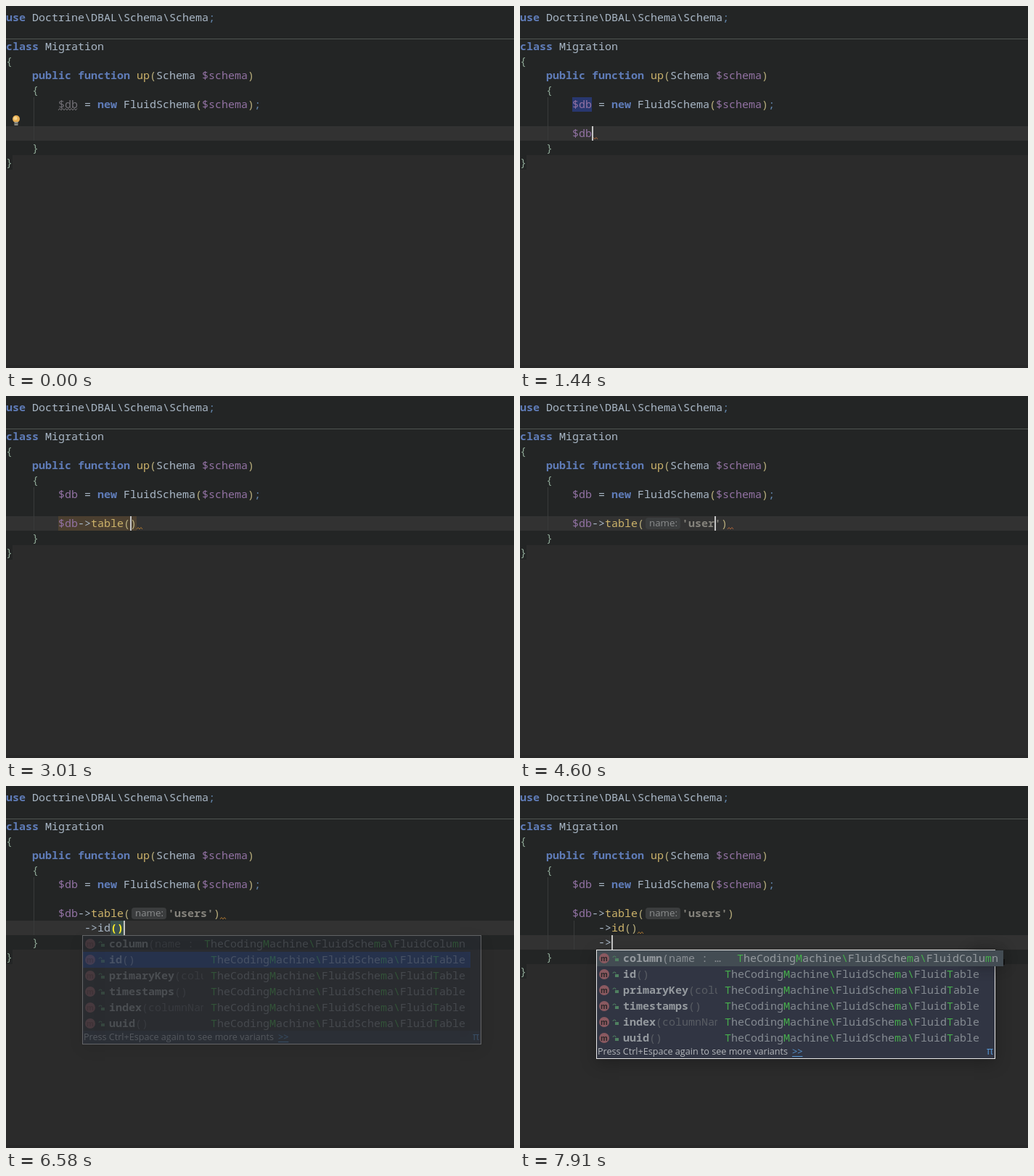
These frames come from a looping animation (700x500 px, 8000 ms). An HTML page with a canvas:

```html
<!DOCTYPE html>
<html lang="en">
<head>
<meta charset="utf-8">
<title>Fluid schema migration</title>
<style>
html, body { margin: 0; width: 100%; height: 100%; overflow: hidden; background: #2b2b2b; }
canvas { display: block; }
</style>
</head>
<body>
<canvas id="stage" width="700" height="500"></canvas>
<script>
const ctx = document.getElementById('stage').getContext('2d');
const LOOP = 8000, CH = 9, LINE = 20, HINT = 52;
const MONO = '15px "Noto Sans Mono", "DejaVu Sans Mono", monospace';
const SANS = '"Open Sans", "Noto Sans", sans-serif';

const C = {
  bg: '#2b2b2b', code: '#232525', row: '#323232', text: '#a9b7c6', keyword: '#5f7cb8',
  variable: '#9272a3', func: '#cdb36a', string: '#85837c', paren: '#b9ae7c', brace: '#8ca594',
  semi: '#6286ad', unused: '#727076', guide: '#393b3b', warn: '#a87430',
  matchBg: '#3b514d', match: '#ffef28', popup: '#313543', green: '#46ad4c'
};

const NS = 'TheCodingMachine\\FluidSchema\\';
const TABLE = NS + 'FluidTable', SCHEMA = 'Doctrine\\DBAL\\Schema\\Schema';
const LISTS = {
  vars: {
    rows: [
      ['schema', SCHEMA], ['this', NS + 'Migration'], ['db', NS + 'FluidSchema'],
      ['_COOKIE', 'array'], ['_ENV', 'array'], ['_FILES', 'array']
    ],
    height: 139, hint: 'global'
  },
  db: {
    rows: [
      ['junctionTable(table1, table2)', NS + 'FluidSchema'],
      ['table(name : string)', TABLE], ['getDbalSchema()', SCHEMA]
    ],
    height: 84, hint: 'more'
  },
  table: {
    rows: [
      ['column(name : string)', NS + 'FluidColumn'], ['id()', TABLE],
      ['primaryKey(columnNames)', TABLE], ['timestamps()', TABLE],
      ['index(columnNames)', TABLE], ['uuid()', TABLE]
    ],
    height: 150, hint: 'more'
  }
};

// Each event changes part of the editor state.
const start = {
  lines: ['', '', ''], row: 0, caret: -1, unused: true, bulb: true, write: false, warn: null,
  glow: 0, hint: false, match: null, plainId: false, inner: false,
  list: null, x: 0, y: 0, alpha: 1, lock: false, sel: 0, wide: false, glare: 0, active: false
};
const events = [
  [170, { caret: 72 }],
  [740, { l0: '$', caret: 81, bulb: false }],
  [830, { list: 'vars', x: 60, y: 186, alpha: .35 }],
  [870, { alpha: .7 }],
  [920, { alpha: 1 }],
  [1050, { l0: '$d', caret: 90 }],
  [1090, { l0: '$db', caret: 99, alpha: .35 }],
  [1130, { list: null }],
  [1440, { unused: false, write: true, warn: [99, 0] }],
  [1590, { l0: '$db-', caret: 108, warn: [108, 0] }],
  [1640, { l0: '$db->', caret: 117, warn: [117, 0] }],
  [1790, { list: 'db', x: 96, y: 186, alpha: .4 }],
  [1830, { alpha: 1 }],
  [1880, { lock: true }],
  [1920, { wide: true, glare: 1 }],
  [2340, { caret: -1 }],
  [2430, { sel: 1, wide: false, glare: 0, active: true }],
  [2470, { wide: true }],
  [2700, { l0: '$db->table()', caret: 171, warn: null, alpha: .3, wide: false }],
  [2740, { list: null }],
  [3010, { write: false, glow: 108, warn: [180, 0] }],
  [3540, { l0: "$db->table('')", caret: 180, glow: 126 }],
  [3670, { warn: [198, 0] }],
  [3980, { glow: 0 }],
  [4020, { hint: true, caret: 232, warn: [250, 0] }],
  [4280, { l0: "$db->table('u')", caret: 241, warn: [259, 0] }],
  [4350, { l0: "$db->table('us')", caret: 250, warn: [268, 0] }],
  [4430, { l0: "$db->table('use')", caret: 259, warn: [277, 0] }],
  [4600, { l0: "$db->table('user')", caret: 268, warn: [286, 0] }],
  [4690, { l0: "$db->table('users')", caret: 277, warn: [295, 0] }],
  [4960, { match: [162, 286, 0], caret: 295 }],
  [5240, { row: 1, caret: 108 }],
  [5280, { match: null }],
  [5600, { l1: '-', caret: 117 }],
  [5690, { l1: '->', caret: 126 }],
  [5780, { list: 'table', x: 105, y: 206, alpha: 1, lock: false, sel: 0, wide: false, active: false }],
  [5820, { lock: true }],
  [5870, { wide: true, glare: 1 }],
  [6060, { glare: .5 }],
  [6110, { glare: 0 }],
  [6280, { wide: false }],
  [6330, { sel: 1, active: true }],
  [6580, { l1: '->id()', caret: 162, plainId: true, match: [144, 153, 1], alpha: .3 }],
  [6620, { list: null }],
  [6840, { plainId: false, warn: [162, 1] }],
  [7010, { row: 2, caret: 108, match: null, inner: true }],
  [7610, { l2: '-', caret: 117 }],
  [7690, { l2: '->', caret: 126 }],
  [7820, { list: 'table', x: 105, y: 226, alpha: 1, lock: false, sel: 0, active: false }],
  [7870, { lock: true }],
  [7910, { wide: true, glare: 1 }]
];

function stateAt(t) {
  const s = { ...start };
  for (const [time, change] of events) if (time <= t) Object.assign(s, change);
  s.lines = [s.l0 || '', s.l1 || '', s.l2 || ''];
  return s;
}

function rect(x, y, w, h, color) {
  ctx.fillStyle = color;
  ctx.fillRect(x, y, w, h);
}

function text(str, x, y, color, font = MONO) {
  ctx.font = font;
  ctx.fillStyle = color;
  ctx.fillText(str, x, y);
}

function disc(x, y, r, color) {
  ctx.fillStyle = color;
  ctx.beginPath();
  ctx.arc(x, y, r, 0, 7);
  ctx.fill();
}

function wave(x, y, w, color) {
  ctx.strokeStyle = color;
  ctx.lineWidth = 1;
  ctx.beginPath();
  for (let i = 0; i <= w; i += 2) ctx.lineTo(x + i, y + (i % 4 ? -1.5 : 1));
  ctx.stroke();
}

function style(tok, s) {
  if (/^(use|class|public|function|new)$/.test(tok)) return [C.keyword, true];
  if (/^\$\w/.test(tok)) return [C.variable];
  if (tok[0] === "'") return [C.string, true];
  if (tok === 'id' && s.plainId) return [C.text];
  if (/^(up|table|id)$/.test(tok)) return [C.func];
  if (/[()]/.test(tok)) return [C.paren];
  if (/[{}]/.test(tok)) return [C.brace];
  return [tok === ';' ? C.semi : C.text];
}

function codeLine(str, x, top, s, hint) {
  for (const tok of str.match(/\$\w*|'\w*'|\w+|./g) || []) {
    let [color, bold] = style(tok, s);
    if (s.unused && tok === '$db' && top === 126) color = C.unused;
    if (tok !== ' ') text(tok, x, top + 15, color, (bold ? 'bold ' : '') + MONO);
    x += tok.length * CH;
    if (hint && tok === '(') x += HINT;
  }
}

function drawBulb() {
  disc(14, 156, 5, '#e6ad52');
  disc(13, 155, 2.5, '#f7d48b');
  rect(11.5, 160, 5, 5, '#8d8d86');
  rect(11.5, 162, 5, 1, '#565650');
}

function drawEditor(s) {
  const shift = s.row * LINE, caretTop = 166 + shift, end = 206 + shift;
  rect(0, 0, 700, 500, C.bg);
  rect(0, 496, 700, 4, '#282828');
  rect(0, 0, 700, end, C.code);
  rect(0, end, 9, LINE, C.code);
  rect(0, caretTop, 700, LINE, C.row);
  rect(0, 45, 700, 1, '#505552');
  rect(38, 126, 1, 60 + shift, C.guide);
  if (s.inner) rect(74, 186, 1, 40, C.guide);
  if (s.write) rect(72, 126, 27, LINE, '#28376f');
  if (s.glow) rect(72, 166, s.glow, LINE, '#4b3f30');

  const fixed = [
    ['use ' + SCHEMA + ';', 0, 6], ['class Migration', 0, 46], ['{', 0, 66],
    ['public function up(Schema $schema)', 36, 86], ['{', 36, 106],
    ['$db = new FluidSchema($schema);', 72, 126], ['}', 36, 186 + shift], ['}', 0, end]
  ];
  for (const [str, x, top] of fixed) codeLine(str, x, top, s);
  if (s.unused) wave(72, 143, 27, '#77767a');
  s.lines.forEach((str, i) => codeLine(str, i ? 108 : 72, 166 + i * LINE, s, s.hint && !i));

  if (s.hint) {
    ctx.fillStyle = '#3b3d3e';
    ctx.beginPath();
    ctx.roundRect(173, 168, 48, 16, 4);
    ctx.fill();
    text('name:', 178, 180, '#8a8c8d', '13.3px ' + SANS);
  }
  if (s.match) {
    const [open, close, line] = s.match, top = 166 + line * LINE;
    [[open, '('], [close, ')']].forEach(([x, ch]) => {
      rect(x, top, CH, LINE, C.matchBg);
      text(ch, x, top + 15, C.match, 'bold ' + MONO);
    });
  }
  if (s.warn) wave(s.warn[0], 183 + s.warn[1] * LINE, 8, s.row || s.glow ? C.warn : '#a8623a');
  if (s.caret >= 0) rect(s.caret, caretTop, 2, LINE, '#c4c4c4');
  if (s.bulb) drawBulb();
}

function drawIcon(letter, x, y) {
  const color = { m: '#8a5960', p: '#a8712f', s: '#7c6145' }[letter];
  disc(x, y, 7, color);
  ctx.textAlign = 'center';
  text(letter, x, y + 3.5, '#2a2628', 'bold 10px ' + SANS);
  ctx.textAlign = 'left';
}

function drawLock(x, y) {
  rect(x, y, 5, 4, '#4f8060');
  ctx.strokeStyle = '#4f8060';
  ctx.lineWidth = 1;
  ctx.beginPath();
  ctx.arc(x - 1, y - 1, 2, Math.PI, 0);
  ctx.stroke();
}

function typeName(str, x, y, color) {
  for (const part of str.match(/[TMm\\]|[^TMm\\]+/g)) {
    text(part, x, y, /^[TMm\\]$/.test(part) ? C.green : color);
    x += part.length * CH;
  }
}

function drawRow(s, i, kind) {
  const [label, type] = LISTS[s.list].rows[i];
  const on = i === s.sel, vars = kind === 'vars', right = s.x + 550;
  const top = s.y + 1 + i * 22, mid = top + 11, base = mid + 5;
  const textX = s.x + (s.lock ? 37 : 21);
  let typeX = right - 22 - type.length * CH, rowEnd = right - 15, shown = label;

  // Labels are shortened to the room there was before the lock column.
  const room = Math.floor((typeX - 10 - s.x - 21) / CH);
  if (label.length > room && !(on && s.wide && i)) shown = label.slice(0, room - 1) + '…';
  const wide = on && s.wide;
  if (wide) {
    typeX = textX + shown.length * CH + 22;
    rowEnd = typeX + type.length * CH + 7;
  }
  if (on) {
    ctx.save();
    if (s.glare) {
      ctx.shadowColor = `rgba(20,20,20,${.45 * s.glare})`;
      ctx.shadowBlur = 18;
    }
    if (wide) rect(rowEnd - 45, top, 45, 22, '#434c53');
    ctx.restore();
    rect(s.x + 1, top, rowEnd - s.x - 1, 22, s.active ? '#1e3f8c' : '#434c53');
    if (s.glare) rect(rowEnd, top + 12, 2, 8, '#111');
  }

  drawIcon(vars ? (i ? 's' : 'p') : 'm', s.x + 11, mid);
  if (s.lock) drawLock(s.x + 26, mid);
  ctx.save();
  ctx.beginPath();
  ctx.rect(s.x, top, typeX - 10 - s.x, 22);
  ctx.clip();
  const cut = shown.indexOf('('), name = cut < 0 ? shown : shown.slice(0, cut);
  text(name, textX, base, vars ? '#848b91' : '#959a9f', (vars ? '' : 'bold ') + MONO);
  if (cut >= 0) text(shown.slice(cut), textX + cut * CH, base, on ? '#8b9095' : '#595d64');
  ctx.restore();
  typeName(type, typeX, base, on ? '#959b9f' : '#858b92');
}

function drawPopup(s) {
  const { rows, height, hint } = LISTS[s.list], vars = s.list === 'vars';
  ctx.save();
  ctx.globalAlpha = s.alpha;
  ctx.save();
  ctx.shadowColor = 'rgba(0,0,0,.25)';
  ctx.shadowBlur = 20;
  ctx.shadowOffsetY = 6;
  rect(s.x, s.y, 550, height + 1, C.popup);
  ctx.restore();
  ctx.strokeStyle = '#e9e9e9';
  ctx.lineWidth = 1;
  ctx.strokeRect(s.x + .5, s.y + .5, 549, height);

  ctx.save();
  ctx.beginPath();
  ctx.rect(0, s.y - 20, 700, height + 2);
  ctx.clip();
  rows.forEach((_, i) => { if (i !== s.sel) drawRow(s, i, s.list); });
  drawRow(s, s.sel, s.list);
  ctx.restore();

  if (vars) rect(s.x + 540, s.y + 2, 8, 27, '#585c59');
  rect(s.x + 1, s.y + height - 18, 548, 18, C.popup);
  const font = '12.6px ' + SANS, base = s.y + height - 5;
  const msg = `Press Ctrl+Espace again to see ${hint} variants`;
  text(msg, s.x + 2, base, '#b4b7bb', font);
  const linkX = s.x + 8 + ctx.measureText(msg).width;
  text('>>', linkX, base, '#5796d2', font);
  rect(linkX, base + 2, ctx.measureText('>>').width, 1, '#5796d2');
  text('π', s.x + 538, base, '#5796d2', '14px ' + SANS);
  ctx.restore();
}

function frame() {
  const s = stateAt(performance.now() % LOOP);
  drawEditor(s);
  if (s.list) drawPopup(s);
  requestAnimationFrame(frame);
}
const origin = performance.now();
const clock = performance.now.bind(performance);
performance.now = () => clock() - origin;
frame();
</script>
</body>
</html>
```
